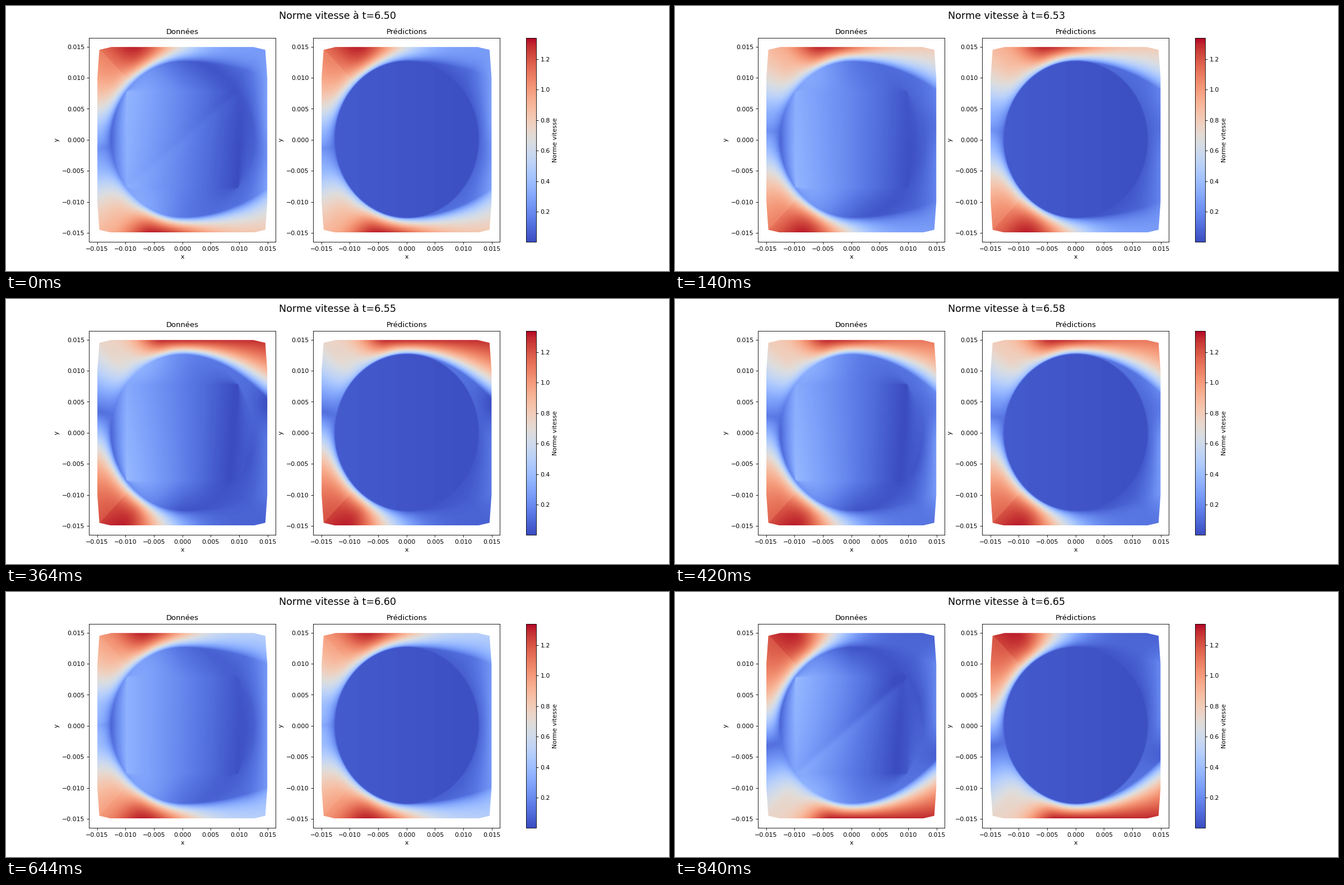
Write a matplotlib script that moves like this. It is 1183 px wide and 473 px high and loops after 980 ms.

```python
import numpy as np
import matplotlib.pyplot as plt
from matplotlib.animation import FuncAnimation
from matplotlib.colors import Normalize
from matplotlib.patches import Polygon

W, H, DPI = 1183, 473, 78.87
FRAMES, STEP = 7, 140
R, EDGE, LIM = 12.55, 14.95, 16.44      # millimetres
GROWTH = 1.5                            # steepness of the shear layers

X, Y = np.meshgrid(np.linspace(-EDGE, EDGE, 456), np.linspace(-EDGE, EDGE, 500))
RAD = np.hypot(X, Y)
ANG = np.degrees(np.abs(np.arctan2(Y, X)))
REACH = EDGE / np.maximum(np.abs(X), np.abs(Y))   # scale factor out to the edge
HX, HY = X * REACH, Y * REACH


def bump(x, width):
    return np.exp(-(x / width) ** 2)


def rise(f, k=GROWTH):
    return (1 - np.exp(-k * f)) / (1 - np.exp(-k))


class Wake:
    """Speed around the disc at one phase of the vortex street."""

    def __init__(self, k):
        self.phase = 2 * np.pi * k / FRAMES - np.radians(26)
        self.s = 1.07 * np.sin(self.phase)       # -1: jet below, +1: jet above
        self.rim = .06 + .22 * bump(ANG - 128, 32) + .08 * self.s * Y / RAD
        self.rim = np.maximum(self.rim, .03)

    def second(self, lag):
        return np.cos(2 * self.phase - np.radians(lag))

    def inlet(self, y):
        d = y - 3.2 * self.s
        top = 1.06 - .18 * self.s * np.sign(d)
        low = .32 - .2 * abs(self.s)
        return top * (1 - np.exp(-(np.abs(d) / 7.2) ** 1.3)) + low * bump(d, 3)

    def wall(self, x, side):
        """Speed along the upper (side=1) or lower (side=-1) wall."""
        s = side * self.s
        peak = -7 + 3.5 * s
        start, end = self.inlet(side * EDGE), .5 + .585 * s + .165 * s * s
        base = np.where(x < peak, start, end)
        return base + (1.31 - base) * bump(x - peak, np.where(x < peak, 5, 8.7))

    def front(self):
        wall = np.where(Y > 0, self.wall(HX, 1), self.wall(HX, -1))
        edge = np.where(np.abs(X) >= np.abs(Y), self.inlet(HY), wall)
        gap = RAD * REACH - R
        thick = 1.2 + .4 * (Y / RAD) ** 4
        near = rise(np.clip((RAD - R) / gap, 0, 1), gap / thick)
        return self.rim + (edge - self.rim) * near

    def back(self):
        s = self.s
        outlet = .21 - .08 * self.second(122) - .13 * abs(s) * bump(Y - 4.5 * s, 3.5)
        mix = np.clip((RAD - R) / (RAD * REACH - R), 0, 1) * X / EDGE
        v = self.rim + (outlet - self.rim) * mix
        for side in (1, -1):
            foot = R - (.012 + .019 * max(side * s, 0)) * X ** 2
            f = np.clip((side * Y - foot) / (EDGE - foot), 0, 1)
            v = v + (self.wall(X, side) - v) * rise(f)
        return v

    def inside(self):
        s = self.s
        zero = 9.9 + 1.5 * self.second(20) + .08 * Y
        v = .34 * np.abs(zero - X) / (zero + 9.5)
        v -= .004 * s * Y * np.clip((5 - X) / 15, 0, 1)
        d = (Y - .8 * X) / 1.28                  # crease along the diagonal
        v -= .035 * max(-s, 0) * np.tanh(2 * d) * np.exp(-np.abs(d) / 3)
        box = np.maximum(np.abs(X) / 9.8, np.abs(Y) / 7.7)
        q = np.clip((box - 1) / np.maximum(box * R / RAD - 1, .01), 0, 1)
        return v + (self.rim - v) * q

    def fields(self):
        out = np.where(X < 0, self.front(), self.back())
        data = np.where(RAD < R, self.inside(), out)
        still = np.clip(.03 - .0016 * X, .012, .05)
        return data, still + (out - still) * np.clip((RAD - R) / .25, 0, 1)


fig = plt.figure(figsize=((W + .1) / DPI, (H + .1) / DPI), dpi=DPI)
heading = fig.suptitle("", fontsize=16)
norm = Normalize(.0015, 1.34)
corner = np.array([(EDGE, 10), (14.6, 14.5), (12.5, EDGE)]) / 1000
hull = np.concatenate([corner, corner[::-1] * (-1, 1),
                       -corner, corner[::-1] * (1, -1)])


def panel(left, title):
    ax = fig.add_axes([left / W, .11, 333.4 / W, .77])
    e, lim = EDGE / 1000, LIM / 1000
    im = ax.imshow(np.zeros_like(X), extent=(-e, e, -e, e), origin="lower",
                   aspect="auto", interpolation="bilinear", norm=norm,
                   cmap="coolwarm")
    im.set_clip_path(Polygon(hull, transform=ax.transData))
    ticks = np.arange(-3, 4) * .005
    ax.set(title=title, xlabel="x", ylabel="y", xticks=ticks, yticks=ticks,
           xlim=(-lim, lim), ylim=(-lim, lim))
    return im


images = [panel(147.9, "Données"), panel(548, "Prédictions")]
cax = fig.add_axes([927.6 / W, .11, 18.2 / W, .77])
fig.colorbar(images[1], cax=cax, label="Norme vitesse",
             ticks=np.arange(1, 7) * .2)


def update(k):
    for im, field in zip(images, Wake(k).fields()):
        im.set_data(field)
    heading.set_text(f"Norme vitesse à t={(650 + int(2.5 * k + .5)) / 100:.2f}")
    return [*images, heading]


anim = FuncAnimation(fig, update, frames=FRAMES, interval=STEP, repeat=True,
                     repeat_delay=0, blit=False)
plt.show()
```
